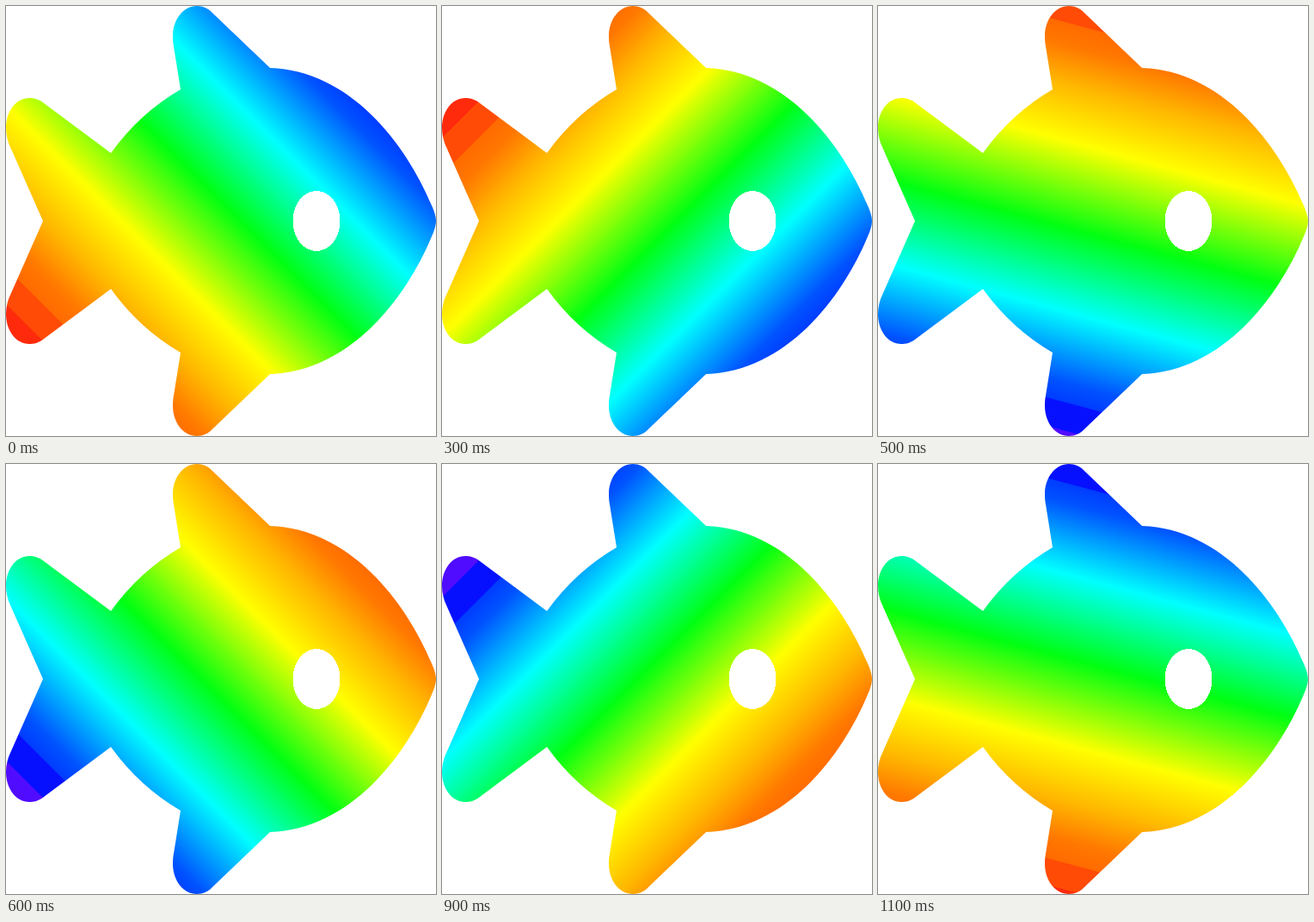
An HTML page for the animation above (1200 ms loop, 500 by 500 pixels).

```html
<!DOCTYPE html>
<html lang="en">
<head>
<meta charset="utf-8">
<title>Rainbow fish</title>
<style>
  html, body { margin: 0; width: 100%; height: 100%; overflow: hidden; background: #fff; }
  svg { display: block; width: 100vw; height: 100vh; }
  .rainbow {
    transform-origin: 0 0;
    animation: turn 1.2s steps(12, end) infinite;
  }
  @keyframes turn {
    from { transform: rotate(-45deg); }
    to { transform: rotate(315deg); }
  }
</style>
</head>
<body>
<svg viewBox="0 0 500 500" shape-rendering="crispEdges">
  <defs>
    <linearGradient id="spectrum" gradientUnits="userSpaceOnUse" x1="-250" x2="250" y1="0" y2="0">
      <!-- flat bands at both ends, smooth in between -->
      <stop offset="1%" stop-color="#ff2a0c"/>
      <stop offset="1%" stop-color="#ff4b06"/>
      <stop offset="7%" stop-color="#ff4b06"/>
      <stop offset="7%" stop-color="#ff6a00"/>
      <stop offset="12%" stop-color="#ff7800"/>
      <stop offset="21%" stop-color="#ffb800"/>
      <stop offset="33.6%" stop-color="#ff0"/>
      <stop offset="53.2%" stop-color="#00ff12"/>
      <stop offset="72%" stop-color="#0ff"/>
      <stop offset="88%" stop-color="#0052ff"/>
      <stop offset="92.4%" stop-color="#003cff"/>
      <stop offset="92.4%" stop-color="#0610ff"/>
      <stop offset="98.8%" stop-color="#0610ff"/>
      <stop offset="98.8%" stop-color="#500cff"/>
    </linearGradient>
    <path id="half" d="M43 250 L5 164 C2 158 0 150 0 142 C0 122 12 107 27 107
      C32 107 38 108 44 113 L122 171 Q155 125 203 97 L195 47
      C194 42 194 38 194 35 C194 16 206 0 222 0 C229 0 236 3 241 9
      L307 72 C400 75 465 160 495 232 Q500 243 500 250 Z"/>
    <clipPath id="fish">
      <use href="#half"/>
      <use href="#half" transform="matrix(1 0 0 -1 0 500)"/>
    </clipPath>
  </defs>
  <g clip-path="url(#fish)">
    <g transform="translate(250 250)">
      <rect class="rainbow" x="-400" y="-400" width="800" height="800" fill="url(#spectrum)"/>
    </g>
  </g>
  <ellipse cx="361" cy="250" rx="27.5" ry="35" fill="#fff"/>
</svg>
</body>
</html>
```
